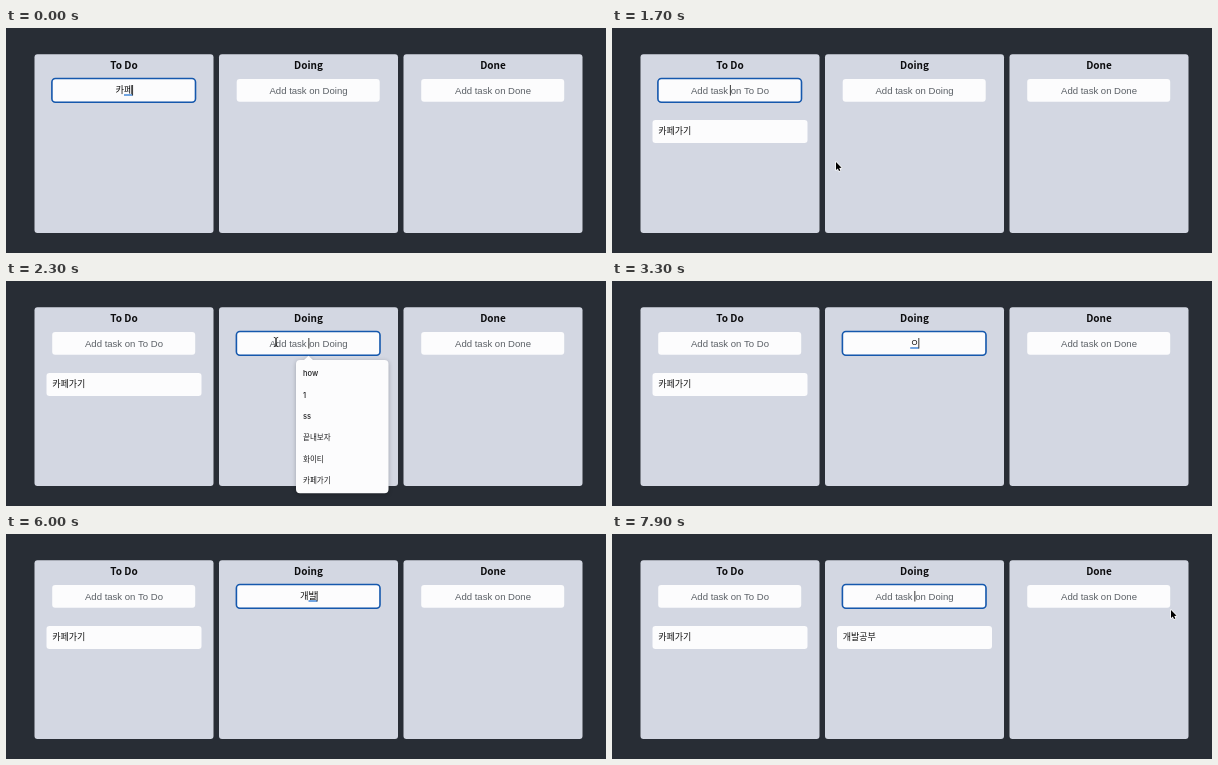
An HTML page with a canvas that plays this animation: 600 by 225 pixels, repeating every 8000 ms.

```html
<!DOCTYPE html>
<html lang="ko">
<head>
<meta charset="utf-8">
<title>Task board</title>
<style>
  html, body { margin: 0; width: 100%; height: 100%; overflow: hidden; background: #282d35; }
  canvas { display: block; width: 600px; height: 225px; }
</style>
</head>
<body>
<canvas id="stage"></canvas>
<script>
const LOOP = 8000, TICK = 100, BLINK = 500;
const KOREAN = '"Noto Sans CJK KR", "Noto Sans CJK JP", "Noto Sans CJK", sans-serif';
const LATIN = '"Liberation Sans", Arial, sans-serif';
const BLUE = '#1558ad';

const columns = [
  { name: 'To Do', x: 28.5 },
  { name: 'Doing', x: 213 },
  { name: 'Done', x: 397.5 },
];

// Each edit: [time, column, text in the input]; an empty text restores the placeholder.
const edits = [
  [0, 0, '카페'], [100, 0, '카펙'], [200, 0, '카페가'], [300, 0, '카페각'], [400, 0, '카페가기'], [550, 0, ''],
  [2300, 1, ''], [3200, 1, 'ㅇ'],
  [5500, 1, ''], [5600, 1, 'ㄱ'], [5700, 1, '개'], [5800, 1, '갭'], [5900, 1, '개바'], [6000, 1, '개발'],
  [6200, 1, '개밝'], [6300, 1, '개발고'], [6400, 1, '개발공'], [6500, 1, '개발공ㅂ'], [6600, 1, '개발공부'], [6800, 1, ''],
];
const cards = [[550, 0, '카페가기'], [6800, 1, '개발공부']];
const suggestions = ['how', '1', 'ss', '끝내보자', '화이티', '카페가기'];
const popupTime = [2300, 3200];

// Pointer paths as [time, x, y]; the pointer hides outside them.
const pointerPaths = [
  { end: 3200, points: [[1500, 190, 108], [1600, 212, 127], [1700, 224, 134], [1900, 246, 104], [2100, 270, 61]] },
  { end: LOOP, points: [[7700, 270, 61], [7800, 420, 84], [7900, 559, 76]] },
];

const canvas = document.getElementById('stage');
const ctx = canvas.getContext('2d');
const ratio = window.devicePixelRatio || 1;
canvas.width = 600 * ratio;
canvas.height = 225 * ratio;
ctx.scale(ratio, ratio);
ctx.textBaseline = 'alphabetic';

function roundBox(x, y, w, h, r, fill) {
  ctx.beginPath();
  ctx.roundRect(x, y, w, h, r);
  ctx.fillStyle = fill;
  ctx.fill();
}

function label(text, x, y, font, color, align = 'left') {
  ctx.font = font;
  ctx.fillStyle = color;
  ctx.textAlign = align;
  ctx.fillText(text, x, y);
}

function drawInput(column, focus, t) {
  const x = column.x + 17.7, center = column.x + 89.5;
  roundBox(x, 51, 143, 22.8, 3, '#fcfcfd');
  if (focus) {
    ctx.beginPath();
    ctx.roundRect(x - 0.3, 50.5, 143.6, 23.7, 3.5);
    ctx.strokeStyle = BLUE;
    ctx.lineWidth = 1.6;
    ctx.stroke();
  }
  const text = focus ? focus[2] : '';
  let caretX = center + 0.3;
  if (text) {
    label(text, center, 65.4, '9.3px ' + KOREAN, '#111', 'center');
    const width = ctx.measureText(text).width;
    const lastWidth = ctx.measureText(text.slice(-1)).width;
    caretX = center + width / 2;
    ctx.fillStyle = '#1c6fd1';
    ctx.fillRect(caretX - lastWidth, 66.4, lastWidth, 1.2);
  } else {
    label('Add task on ' + column.name, center, 65.5, '9.55px ' + LATIN, '#5b6066', 'center');
  }
  if (focus && Math.floor((t - focus[0]) / BLINK) % 2 === 0) {
    ctx.fillStyle = '#222';
    ctx.fillRect(caretX - 0.4, 57, 0.9, 10.5);
  }
}

function drawPopup() {
  ctx.save();
  ctx.shadowColor = 'rgba(0, 0, 0, 0.25)';
  ctx.shadowBlur = 4 * ratio;
  ctx.shadowOffsetY = ratio;
  ctx.beginPath();
  ctx.roundRect(290, 79, 92.5, 133.3, 4);
  ctx.moveTo(297.5, 79.5);
  ctx.lineTo(302.5, 74.8);
  ctx.lineTo(307.5, 79.5);
  ctx.fillStyle = '#fcfcfd';
  ctx.fill();
  ctx.restore();
  suggestions.forEach((text, i) =>
    label(text, 297, 95.2 + i * 21.4, '500 7.5px Inter, ' + KOREAN, '#1c1c1e'));
}

function drawArrow(x, y) {
  const outline = [[0, 0], [0, 8], [1.8, 6.4], [3, 9], [4.4, 8.4], [3.2, 5.9], [5.6, 5.7]];
  ctx.beginPath();
  outline.forEach(([dx, dy]) => ctx.lineTo(x + dx, y + dy));
  ctx.closePath();
  ctx.lineJoin = 'round';
  ctx.strokeStyle = '#fff';
  ctx.lineWidth = 1.4;
  ctx.stroke();
  ctx.fillStyle = '#000';
  ctx.fill();
}

function drawBeam(x, y) {
  ctx.beginPath();
  for (const side of [-1, 1]) {
    ctx.moveTo(x + side * 2.2, y - 4.6);
    ctx.quadraticCurveTo(x, y - 4.6, x, y - 3);
    ctx.lineTo(x, y + 3);
    ctx.quadraticCurveTo(x, y + 4.6, x + side * 2.2, y + 4.6);
  }
  ctx.strokeStyle = '#222';
  ctx.lineWidth = 0.9;
  ctx.stroke();
}

function drawPointer(t) {
  const path = pointerPaths.find(p => t >= p.points[0][0] && t < p.end);
  if (!path) return;
  const next = path.points.findIndex(p => p[0] > t);
  let [, x, y] = path.points.at(-1);
  if (next > 0) {
    const [t0, x0, y0] = path.points[next - 1], [t1, x1, y1] = path.points[next];
    const k = (t - t0) / (t1 - t0);
    x = x0 + (x1 - x0) * k;
    y = y0 + (y1 - y0) * k;
  }
  const overInput = y > 51 && y < 74 && columns.some(c => x > c.x + 18 && x < c.x + 161);
  (overInput ? drawBeam : drawArrow)(x, y);
}

function draw(t) {
  ctx.fillStyle = '#282d35';
  ctx.fillRect(0, 0, 600, 225);
  const current = edits.findLast(e => e[0] <= t);
  columns.forEach((column, i) => {
    roundBox(column.x, 26.2, 179, 178.8, 3, '#d3d7e2');
    label(column.name, column.x + 89.5, 41.2, 'bold 10px ' + KOREAN, '#0c0c0e', 'center');
    drawInput(column, current[1] === i ? current : null, t);
  });
  for (const [time, i, text] of cards) {
    if (t < time) continue;
    const x = columns[i].x;
    roundBox(x + 12, 92, 155, 23, 3, '#fcfcfd');
    label(text, x + 17.7, 106, '500 9px ' + KOREAN, '#111');
  }
  if (t >= popupTime[0] && t < popupTime[1]) drawPopup();
  drawPointer(t);
}

function frame() {
  const t = performance.now() % LOOP;
  draw(Math.floor(t / TICK) * TICK);
  requestAnimationFrame(frame);
}
frame();
</script>
</body>
</html>
```
